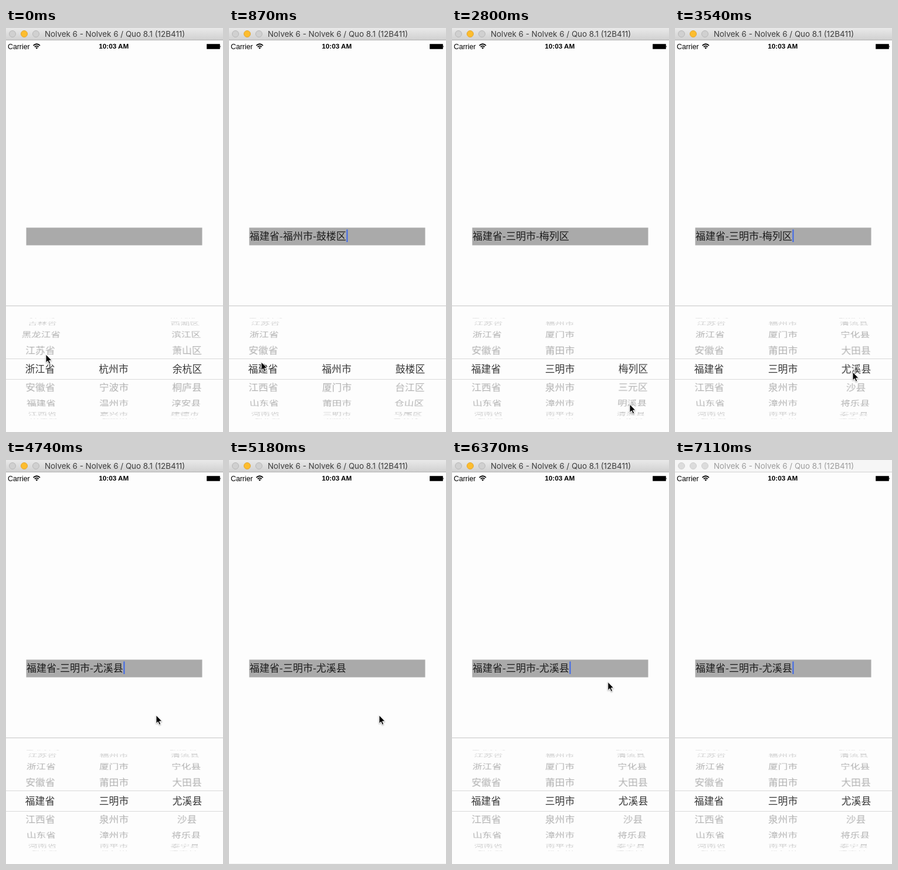
An HTML page for the animation above (7.21 s loop, 370 by 687 pixels).

```html
<!DOCTYPE html>
<html lang="zh">
<head>
<meta charset="utf-8">
<title>Region picker</title>
<style>
  html, body { margin: 0; width: 100%; height: 100%; overflow: hidden; background: #fdfdfd; }
  #stage { position: absolute; left: 0; top: 0; width: 370px; height: 687px; overflow: hidden; }
  svg { position: absolute; left: 0; top: 0; overflow: visible; }
  .cjk, .wheel { font-family: "Noto Sans CJK SC", "Noto Sans CJK", sans-serif; font-weight: 300; }
  .bar { fill: url(#active); }
  .rule { fill: #b2b2b2; }
  .title { font: 13.4px Inter, sans-serif; fill: #3c3c3c; }
  .light { fill: #d0d0d0; stroke: #b8b8b8; }
  .light.on { fill: #fdbd2e; stroke: #e2a630; }
  .inactive .bar { fill: #f6f6f6; }
  .inactive .rule { fill: #d2d2d2; }
  .inactive .title { fill: #9c9c9c; }
  .inactive .light { fill: #dcdcdc; stroke: #cecece; }

  #picker { position: absolute; left: 0; top: 472px; width: 370px; height: 216px; background: #fdfdfd; }
  .line { position: absolute; left: 0; width: 100%; height: 1px; background: #dadada; }
  .line.top { top: 0; background: #c6c6c6; }
  .wheel { position: absolute; inset: 0; overflow: hidden; perspective: 1450px; perspective-origin: 184px 107px; }
  .wheel span {
    position: absolute; top: 91px; width: 120px; height: 32px;
    font-size: 16.8px; line-height: 32px; text-align: center; white-space: nowrap;
  }
  .faded {
    color: #b0b0b0;
    -webkit-mask-image: linear-gradient(transparent 6px, #000 46px, #000 91px, transparent 91px,
      transparent 125px, #000 125px, #000 170px, transparent 210px);
  }
  .chosen { color: #383838; clip-path: inset(91px 0); }
</style>
</head>
<body>
<div id="stage">
  <svg width="370" height="687">
    <defs>
      <linearGradient id="active" x2="0" y2="1">
        <stop stop-color="#e9e9e9"/><stop offset="1" stop-color="#d1d1d1"/>
      </linearGradient>
    </defs>
    <g id="window">
      <rect class="bar" width="370" height="20"/>
      <rect class="rule" y="20" width="370" height="1"/>
      <circle class="light" cx="11" cy="10" r="5.5"/>
      <circle class="light on" cx="31" cy="10" r="5.5"/>
      <circle class="light" cx="51" cy="10" r="5.5"/>
      <text class="title" x="66" y="15">Nolvek 6 - Nolvek 6 / Quo 8.1 (12B411)</text>
    </g>
    <g font-family="Liberation Sans, Arial, sans-serif">
      <text x="3" y="35.5" font-size="12.3">Carrier</text>
      <text x="183.7" y="35.3" font-size="11.7" font-weight="bold" text-anchor="middle">10:03 AM</text>
    </g>
    <g fill="none" stroke="#000" stroke-width="1.8">
      <path d="M46.6 29.8Q52.3 24.6 58 29.8M48.8 32.2Q52.3 29 55.8 32.2"/>
      <path d="M50.3 33.6Q52.3 32 54.3 33.6L52.3 35.8z" fill="#000" stroke="none"/>
    </g>
    <rect x="342" y="27" width="23" height="9" rx="1" fill="#333"/>
    <rect x="343" y="28" width="21" height="7"/>
    <path d="M365.4 29.8q1.6 1.7 0 3.4z"/>
    <rect x="34.5" y="339.5" width="300" height="30" fill="#aaa"/>
    <text id="value" class="cjk" x="35" y="360" font-size="17" fill="#1c1c1c"></text>
    <rect id="caret" x="200.4" y="342.6" width="2" height="21.4" fill="#3c68ec"/>
  </svg>
  <div id="picker">
    <div class="wheel faded"></div>
    <div class="wheel chosen"></div>
    <div class="line top"></div>
    <div class="line" style="top:90px"></div>
    <div class="line" style="top:125px"></div>
  </div>
  <svg width="370" height="687">
    <path id="cursor" d="M0 0V14.2L3.2 11.2L5.4 16.3L7.8 15.3L5.6 10.3H10z"
      stroke="#fff" stroke-width="1" style="filter:drop-shadow(0 1px 1px #0005)"/>
  </svg>
</div>
<script>
const LOOP = 7210, TICK = 148, STEP = 20.3, RADIUS = 91, REACH = 4, PICKER_HEIGHT = 216;
const COLUMN_X = [58, 183.5, 309];
const $ = id => document.getElementById(id);
const names = (text, suffix = '') => text.split(' ').map(name => name + suffix);

const provinces = names('辽宁 吉林 黑龙江 江苏 浙江 安徽 福建 江西 山东 河南 湖北 湖南 广东', '省');
provinces.unshift('内蒙古自治区');
const zhejiangCities = names('杭州 宁波 温州 嘉兴 湖州 绍兴', '市');
const fujianCities = names('福州 厦门 莆田 三明 泉州 漳州 南平 龙岩 宁德', '市');
const hangzhou = names('江干区 拱墅区 西湖区 滨江区 萧山区 余杭区 桐庐县 淳安县 建德市 富阳市');
const fuzhou = names('鼓楼区 台江区 仓山区 马尾区 晋安区 闽侯县');
const sanming = names('梅列区 三元区 明溪县 清流县 宁化县 大田县 尤溪县 沙县 将乐县 泰宁县 建宁县 永安市');

// Times at which each selection takes effect
const PICK = { province: 860, city: 2510, district: 3690 };
const FOCUS = { lost: 4740, gained: 5895 };

// Smooth progress from 0 to 1 between two times
function ease(time, from, to) {
  const p = Math.min(1, Math.max(0, (time - from) / (to - from)));
  return p * p * (3 - 2 * p);
}

const provinceOffset = t => 5 + 2 * ease(t, 290, 740);
const cityOffset = t => 3.22 * ease(t, 1620, 2220) - .22 * ease(t, 2220, 2510);
const districtOffset = t => 3 * ease(t, 2800, 3108) + 3 * ease(t, 3260, 3560);
const slide = t => PICKER_HEIGHT * (ease(t, FOCUS.lost, 5200) - ease(t, FOCUS.gained, 6335));

// Pointer moves: from, to, x, y
const moves = [
  [0, 290, 56, 632], [290, 740, 55, 568],
  [900, 1500, 187, 655], [1620, 2220, 187, 624],
  [2300, 2750, 303, 640], [2800, 3108, 303, 585],
  [3800, 4600, 256, 434], [5250, 5850, 217, 360], [6200, 6660, 385, 420],
];

function pointer(time) {
  return moves.reduce(([x, y], [from, to, nextX, nextY]) => {
    const p = ease(time, from, to);
    return [x + (nextX - x) * p, y + (nextY - y) * p];
  }, [68, 555]);
}

const layers = [...document.querySelectorAll('.wheel')].map(wheel =>
  COLUMN_X.map(x => Array.from({ length: 2 * REACH + 1 }, () => {
    const row = wheel.appendChild(document.createElement('span'));
    row.style.left = x - 60 + 'px';
    return row;
  })));

function drawColumn(column, list, offset) {
  const first = Math.round(offset) - REACH;
  for (const layer of layers) {
    layer[column].forEach((row, i) => {
      const angle = (first + i - offset) * STEP;
      row.textContent = Math.abs(angle) < 89 ? list[first + i] || '' : '';
      row.style.transform = `translateZ(${-RADIUS}px) rotateX(${-angle}deg) translateZ(${RADIUS}px)`;
    });
  }
}

function caretVisible(time) {
  if (time < PICK.province || (time > FOCUS.lost && time < FOCUS.gained)) return false;
  const since = time < FOCUS.gained ? PICK.province : FOCUS.gained;
  return (time - since) % 1100 < 605;
}

function fieldText(time) {
  if (time < PICK.province) return '';
  if (time < PICK.city) return '福建省-福州市-鼓楼区';
  return '福建省-三明市-' + (time < PICK.district ? '梅列区' : '尤溪县');
}

function draw(time) {
  const moved = time >= PICK.province;
  drawColumn(0, provinces, provinceOffset(time));
  drawColumn(1, moved ? fujianCities : zhejiangCities, cityOffset(time));
  if (time >= PICK.city) drawColumn(2, sanming, districtOffset(time));
  else drawColumn(2, moved ? fuzhou : hangzhou, moved ? 0 : 5);

  $('value').textContent = fieldText(time);
  $('caret').style.visibility = caretVisible(time) ? 'visible' : 'hidden';
  $('picker').style.transform = `translateY(${slide(time)}px)`;
  $('cursor').setAttribute('transform', `translate(${pointer(time)})`);
  $('window').classList.toggle('inactive', time > 7000);
}

// The motion advances in coarse ticks, like a screen recording
let shown = -1;
const start = performance.now();
function frame() {
  const tick = Math.floor(((performance.now() - start) % LOOP + 18) / 147.9);
  if (tick !== shown) draw((shown = tick) * TICK);
  requestAnimationFrame(frame);
}
frame();
</script>
</body>
</html>
```
